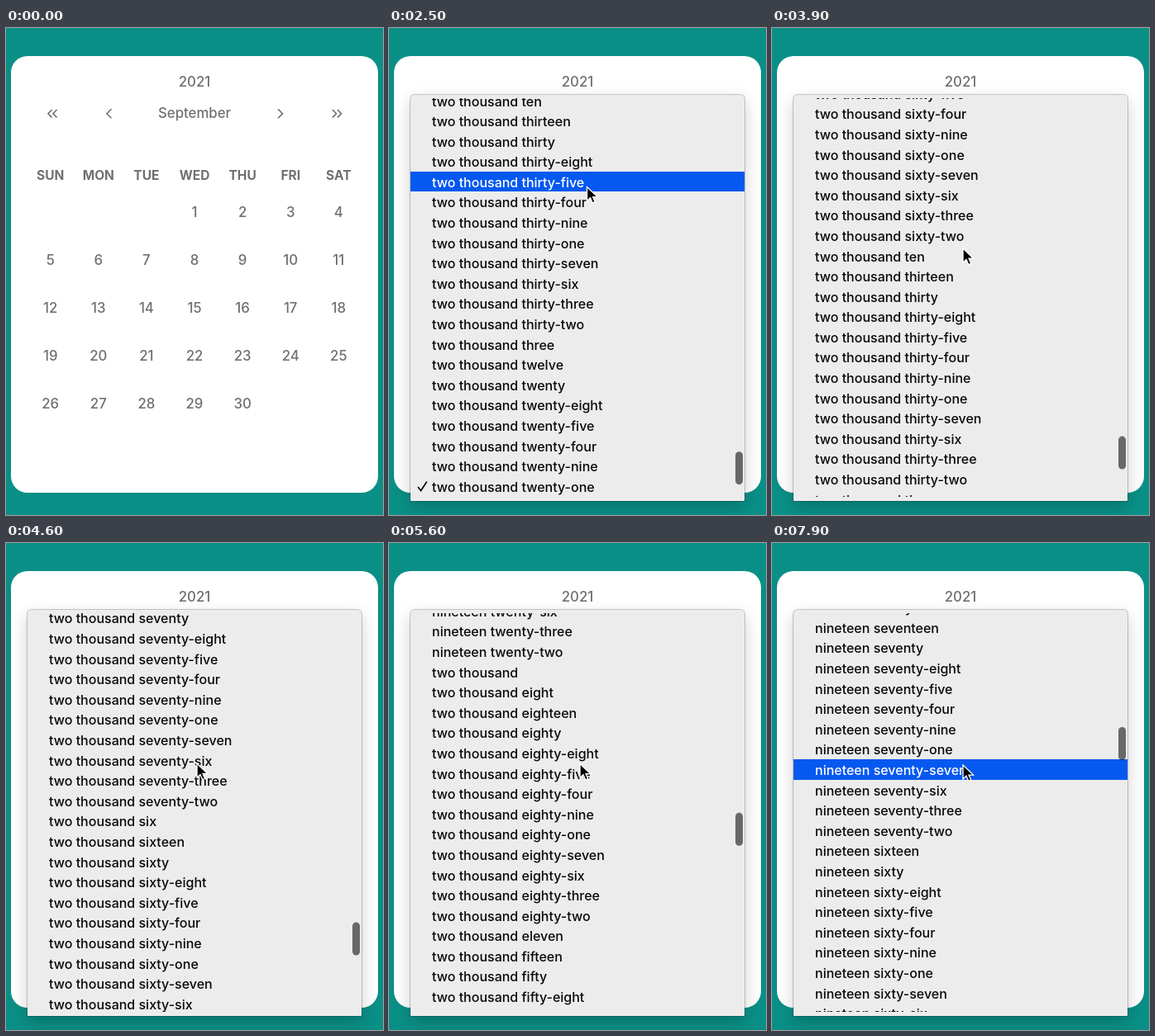
These frames come from a looping animation (456 px wide and 590 px high, 8000 ms). An HTML page:

```html
<!DOCTYPE html>
<html lang="en">
<head>
<meta charset="utf-8">
<title>Year picker</title>
<style>
html, body { margin: 0; width: 100%; height: 100%; overflow: hidden; background: #0a8f86; }
#stage { position: relative; width: 456px; height: 590px; overflow: hidden; font: 500 16px Inter, "Open Sans", sans-serif; }
#stage > * { position: absolute; }
#card { left: 6px; top: 34px; width: 444px; height: 529px; border-radius: 20px; background: #fff; }
svg { overflow: visible; left: 0; top: 0; }
#calendar { fill: #707070; font-size: 16.8px; text-anchor: middle; }
#calendar .day { font-size: 15.5px; font-weight: 700; }
#calendar path { fill: none; stroke: #6d6d6d; stroke-width: 1.6; }
#popup { left: 26px; top: 80.5px; width: 404px; height: 492px; background: #ececec; border-radius: 5px 5px 1px 1px;
  box-shadow: 0 0 0 1px rgba(0,0,0,.2), 0 7px 20px rgba(0,0,0,.2); }
#view { position: absolute; top: 4.5px; width: 100%; height: 483px; overflow: hidden; }
#list div { position: relative; height: 24.6px; line-height: 26px; padding-left: 26px; white-space: nowrap; color: #090909; }
#list div.on { background: #0558f0; color: #fff; }
#list svg { position: absolute; left: 9px; top: 6px; }
#thumb { position: absolute; left: 392.5px; top: 0; width: 9px; height: 40px; border-radius: 5px; background: rgba(0,0,0,.56); }
</style>
</head>
<body>
<div id="stage">
  <div id="card"></div>
  <svg id="calendar" width="456" height="590">
    <path d="M55.5 99l-4.5 4.7 4.5 4.7M61.5 99l-4.5 4.7 4.5 4.7M127.5 98.3l-5.5 5.5 5.5 5.5M329 98.3l5.5 5.5-5.5 5.5M395 99l4.5 4.7-4.5 4.7M401 99l4.5 4.7-4.5 4.7"/>
  </svg>
  <div id="popup"><div id="view"><div id="list"></div></div><div id="thumb"></div></div>
  <svg width="456" height="590">
    <circle id="ring" cx="241" cy="68.3" r="37.3" fill="none" stroke="#111" stroke-width="1.7"/>
    <path id="arrow" fill="#000" stroke="#fff" stroke-width="1.3" d="M0 0v17l4-3.8 2.7 6.2 3-1.3-2.7-6h5.6z"/>
    <g id="hand" fill="#fff" stroke="#111" stroke-width="1.3" stroke-linejoin="round" stroke-linecap="round">
      <path d="M-1.500 1.500C-1.500-.7 1.500-.7 2.200 1.300L4 8c.3-2 3-1.800 3.400.2.4-1.600 3-1.400 3.300.5.5-1.300 2.900-.8 3.200 1.200.4 3.500.2 5.500-1.400 8.300l.2 3.500H3.600l-.4-2.700C1 16.500-2 13.500-4.500 11.500c-1.600-1.500.5-3.300 2.200-2.100l2.400 1.500z"/>
      <path fill="none" d="M5 14.500l.3 4M8 14.300l.2 4.200M10.900 14.300v4"/>
    </g>
  </svg>
</div>
<script>
const $ = id => document.getElementById(id);
const ROW = 24.6, TOP = 85, LOOP = 8000;

// calendar
const label = (x, y, text, cls = '') =>
  $('calendar').insertAdjacentHTML('beforeend', `<text class="${cls}" x="${x}" y="${y}">${text}</text>`);
const column = i => 53.7 + 58.1 * i;
label(228, 71.3, '2021');
label(228, 109, 'September');
'SUN MON TUE WED THU FRI SAT'.split(' ').forEach((d, i) => label(column(i), 183.5, d, 'day'));
for (let d = 1; d <= 30; d++) {
  const cell = d + 2;
  label(column(cell % 7), 229 + 57.9 * Math.floor(cell / 7), d);
}

// years in words, in alphabetical order
const small = ('zero one two three four five six seven eight nine ten eleven twelve thirteen fourteen ' +
  'fifteen sixteen seventeen eighteen nineteen').split(' ');
const tens = '- - twenty thirty forty fifty sixty seventy eighty ninety'.split(' ');
const words = n => n < 20 ? small[n] : tens[n / 10 | 0] + (n % 10 ? '-' + small[n % 10] : '');
function yearName(y) {
  const rest = y % 100;
  if (y >= 2000) return 'two thousand' + (rest ? ' ' + words(rest) : '');
  return words(y / 100 | 0) + (rest > 9 ? '' : ' hundred') + (rest ? ' ' + words(rest) : '');
}
const names = Array.from({ length: 201 }, (_, i) => yearName(1898 + i)).sort();
const chosen = names.indexOf(yearName(2021));
const tick = '<svg width="12" height="12"><path d="M0 7l3.600 4.500 7.200-11" fill="none" stroke="currentColor" stroke-width="1.700"/></svg>';
$('list').innerHTML = names.map((n, i) => `<div>${i === chosen ? tick : ''}${n}</div>`).join('');
const rows = $('list').children;

// keys are [time, value, ...]
function at(keys, t, n = 1) {
  let i = 0;
  while (i < keys.length - 1 && keys[i + 1][0] <= t) i++;
  const a = keys[i], b = keys[i + 1] || a;
  const p = b === a ? 0 : Math.max(0, (t - a[0]) / (b[0] - a[0]));
  return a[n] + (b[n] - a[n]) * p;
}
const scrollKeys = [[2800, 4338], [3000, 4328], [3600, 4270], [4100, 4070], [4600, 3794], [5200, 3310],
  [5600, 2450], [5900, 1730], [6100, 1487], [6200, 1425], [6300, 1397]];
const pointer = [[300, 264, -22], [600, 252, 30], [900, 240, 68], [1900, 240, 68], [2300, 242, 150],
  [2700, 237, 235], [3000, 235, 252], [3300, 231, 267], [7700, 231, 268], [7800, 231, 269]];

const show = (id, on) => $(id).style.visibility = on ? 'visible' : 'hidden';
let lit;

function draw(t) {
  const scroll = at(scrollKeys, t), x = at(pointer, t), y = at(pointer, t, 2);
  const open = t >= 1300, overYear = y > 50 && y < 80;
  show('popup', open);
  show('ring', t >= 1200 && t < 1700);
  show('arrow', t >= 300 && !overYear);
  show('hand', overYear);
  for (const id of ['arrow', 'hand']) $(id).setAttribute('transform', `translate(${x} ${y})`);
  $('list').style.transform = `translateY(${-scroll}px)`;
  $('thumb').style.transform = `translateY(${4 + scroll * .0987}px)`;

  // no row is lit while the wheel turns
  const hover = y > TOP && (t <= 3000 || t >= 7800);
  const index = hover ? Math.floor((y - TOP + scroll) / ROW) : t < 2000 ? chosen : -1;
  if (lit) lit.className = '';
  lit = rows[index];
  if (lit) lit.className = 'on';
}

function frame() {
  draw(Math.floor(performance.now() % LOOP / 100) * 100);
  requestAnimationFrame(frame);
}
frame();
</script>
</body>
</html>
```
